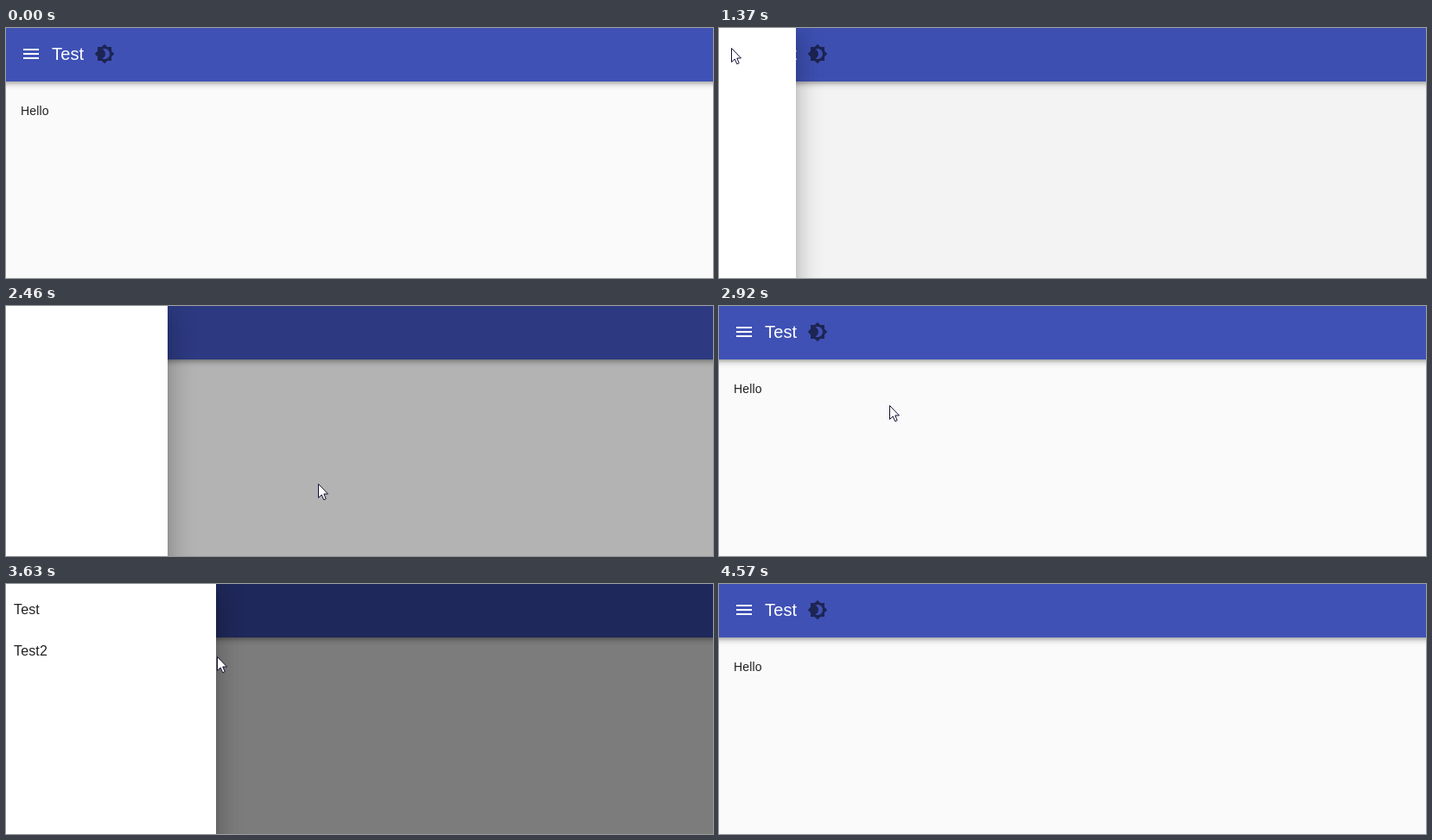
These frames come from a looping animation (818 by 290 pixels, 4880 ms). An HTML page:

```html
<!DOCTYPE html>
<html lang="en">
<head>
<meta charset="utf-8">
<title>Drawer</title>
<style>
html, body { margin: 0; width: 100%; height: 100%; overflow: hidden; }
#stage {
  position: relative; width: 818px; height: 290px; overflow: hidden;
  background: #fafafa; color: rgba(0, 0, 0, .87);
  font-family: "Liberation Sans", Arial, sans-serif;
}
#stage * { position: absolute; }
#bar {
  left: -7px; top: -2px; width: 840px; height: 64px; background: #3f51b5;
  box-shadow: 0 2px 4px -1px rgba(0,0,0,.2), 0 4px 5px rgba(0,0,0,.14), 0 1px 10px rgba(0,0,0,.12);
}
.icon { width: 24px; height: 24px; top: 18px; }
#menu { left: 17px; fill: #fff; }
#theme { left: 102px; fill: rgba(0, 0, 0, .54); }
#title { left: 53px; top: 14px; font-size: 20px; line-height: 32px; letter-spacing: .0075em; color: #fff; }
#hello { left: 17px; top: 86px; font-size: 14px; line-height: 20px; letter-spacing: .01071em; }
#ripple { left: 5px; top: 6px; width: 48px; height: 48px; border-radius: 50%; background: #fff; }
#shade { left: 0; top: 0; width: 818px; height: 290px; background: #000; }
#drawer {
  left: -7px; top: -2px; width: 250px; height: 330px; background: #fff;
  box-shadow: 0 8px 10px -5px rgba(0,0,0,.2), 0 16px 24px 2px rgba(0,0,0,.14), 0 6px 30px 5px rgba(0,0,0,.12);
}
#drawer div { left: 16px; font-size: 16px; line-height: 24px; letter-spacing: .00938em; }
#cursor { left: 0; top: 0; width: 24px; height: 26px; overflow: visible; }
#cursor path { fill: #fff; stroke: #113; stroke-linejoin: round; }
</style>
</head>
<body>
<div id="stage">
  <div id="bar"></div>
  <svg id="menu" class="icon" viewBox="0 0 24 24"><path d="M3 18h18v-2H3v2zm0-5h18v-2H3v2zm0-7v2h18V6H3z"/></svg>
  <div id="title">Test</div>
  <svg id="theme" class="icon" viewBox="0 0 24 24"><path d="M20 8.69V4h-4.69L12 .69 8.69 4H4v4.69L.69 12 4 15.31V20h4.69L12 23.31 15.31 20H20v-4.69L23.31 12 20 8.69zM12 18c-.89 0-1.74-.2-2.5-.55C11.56 16.5 13 14.42 13 12s-1.44-4.5-3.5-5.45C10.26 6.2 11.11 6 12 6c3.31 0 6 2.69 6 6s-2.69 6-6 6z"/></svg>
  <div id="hello">Hello</div>
  <div id="ripple"></div>
  <div id="shade"></div>
  <div id="drawer">
    <div style="top:20px">Test</div>
    <div style="top:68px">Test2</div>
  </div>
  <svg id="cursor">
    <path id="arrow" d="M.5 .5V16.5L4.2 13 6.8 18.8 9.2 17.7 6.8 12H11.5Z"/>
    <path id="hand" transform="translate(-6 0)" d="M5.5 14.5V2.3C5.5 0 8.8 0 8.8 2.3V7.5C9 6 11.6 6.2 11.8 8c.4-1.2 2.6-1 2.9.8.5-1 2.3-.8 2.3 1.2v5.5c0 4-2.5 7.5-6 7.5-3.8 0-5.3-1.5-6.8-4.2L.9 13.6c-.8-1.8 1.2-2.7 2.4-1.4zM8.8 7.5V12M11.8 8v4M14.7 8.8v3.4"/>
  </svg>
</div>
<script>
const LOOP = 4880, STEP = 78, LEAD = 33;
const ENTER = 217, LEAVE = 195, RIPPLE = 550, PRESS = 100;
const VISIBLE = { from: 70, to: 4560 };

const visits = [
  { open: 1340.2, close: 2397 },
  { open: 3409, close: 4365 }
];

// Pointer moves: each glides from the previous resting place.
const moves = [
  { from: 70, to: 590, x: 64, y: 107 },
  { from: 590, to: 1130, x: 14, y: 23 },
  { from: 1690, to: 2070, x: 361, y: 206 },
  { from: 2460, to: 3330, x: 43, y: 30 },
  { from: 3500, to: 3790, x: 433, y: 134 },
  { from: 4020, to: 4330, x: 512, y: 171 }
];
const entry = { x: 511, y: 273 };
const button = { x: 29, y: 30, reach: 16 };

const $ = id => document.getElementById(id);
const [ripple, shade, drawer, cursor, arrow, hand] =
  ['ripple', 'shade', 'drawer', 'cursor', 'arrow', 'hand'].map($);
const clamp = v => Math.min(1, Math.max(0, v));

function bezier(x1, y1, x2, y2) {
  const at = (a, b, s) => 3 * (1 - s) * (1 - s) * s * a + 3 * (1 - s) * s * s * b + s * s * s;
  return x => {
    if (x <= 0 || x >= 1) return clamp(x);
    let lo = 0, hi = 1;
    for (let i = 0; i < 24; i++) {
      const mid = (lo + hi) / 2;
      if (at(x1, x2, mid) < x) lo = mid; else hi = mid;
    }
    return at(y1, y2, lo);
  };
}
const easeOut = bezier(0, 0, .2, 1);
const easeInOut = bezier(.4, 0, .2, 1);
const sharp = bezier(.4, 0, .6, 1);
const glide = bezier(.3, .1, .6, 1);

// The picture moves in steps, like a screen recording timed to 10 ms.
function stepTime(time) {
  const tick = n => Math.max(0, Math.floor((n * STEP - LEAD) / 10) * 10);
  const n = Math.floor((time + LEAD) / STEP);
  return tick(tick(n + 1) <= time ? n + 1 : n);
}

function drawDrawer(t) {
  let slide = 0, fade = 0, scale = 0, glow = 0;
  for (const { open, close } of visits) {
    const press = open - PRESS;
    if (t < press || t > close + LEAVE) continue;
    const enter = (t - open) / ENTER, leave = (t - close) / LEAVE;
    slide = easeOut(enter) * (1 - sharp(leave));
    fade = easeInOut(enter) * (1 - easeInOut(leave));
    scale = easeInOut((t - press) / RIPPLE);
    glow = .3 * (1 - easeInOut((t - open) / RIPPLE));
  }
  drawer.style.visibility = slide > 0 ? 'visible' : 'hidden';
  drawer.style.transform = `translateX(${Math.round(250 * (slide - 1))}px)`;
  shade.style.opacity = fade / 2;
  ripple.style.transform = `scale(${scale})`;
  ripple.style.opacity = glow;
}

function drawCursor(t) {
  let { x, y } = entry;
  for (const move of moves) {
    const k = glide((t - move.from) / (move.to - move.from));
    x += (move.x - x) * k;
    y += (move.y - y) * k;
  }
  const pointing = Math.hypot(x - button.x, y - button.y) < button.reach;
  cursor.style.display = t >= VISIBLE.from && t < VISIBLE.to ? 'block' : 'none';
  cursor.style.transform = `translate(${Math.round(x)}px, ${Math.round(y)}px)`;
  hand.style.display = pointing ? 'inline' : 'none';
  arrow.style.display = pointing ? 'none' : 'inline';
}

const start = performance.now();
function loop() {
  const t = stepTime((performance.now() - start) % LOOP);
  drawDrawer(t);
  drawCursor(t);
  requestAnimationFrame(loop);
}
loop();
</script>
</body>
</html>
```
